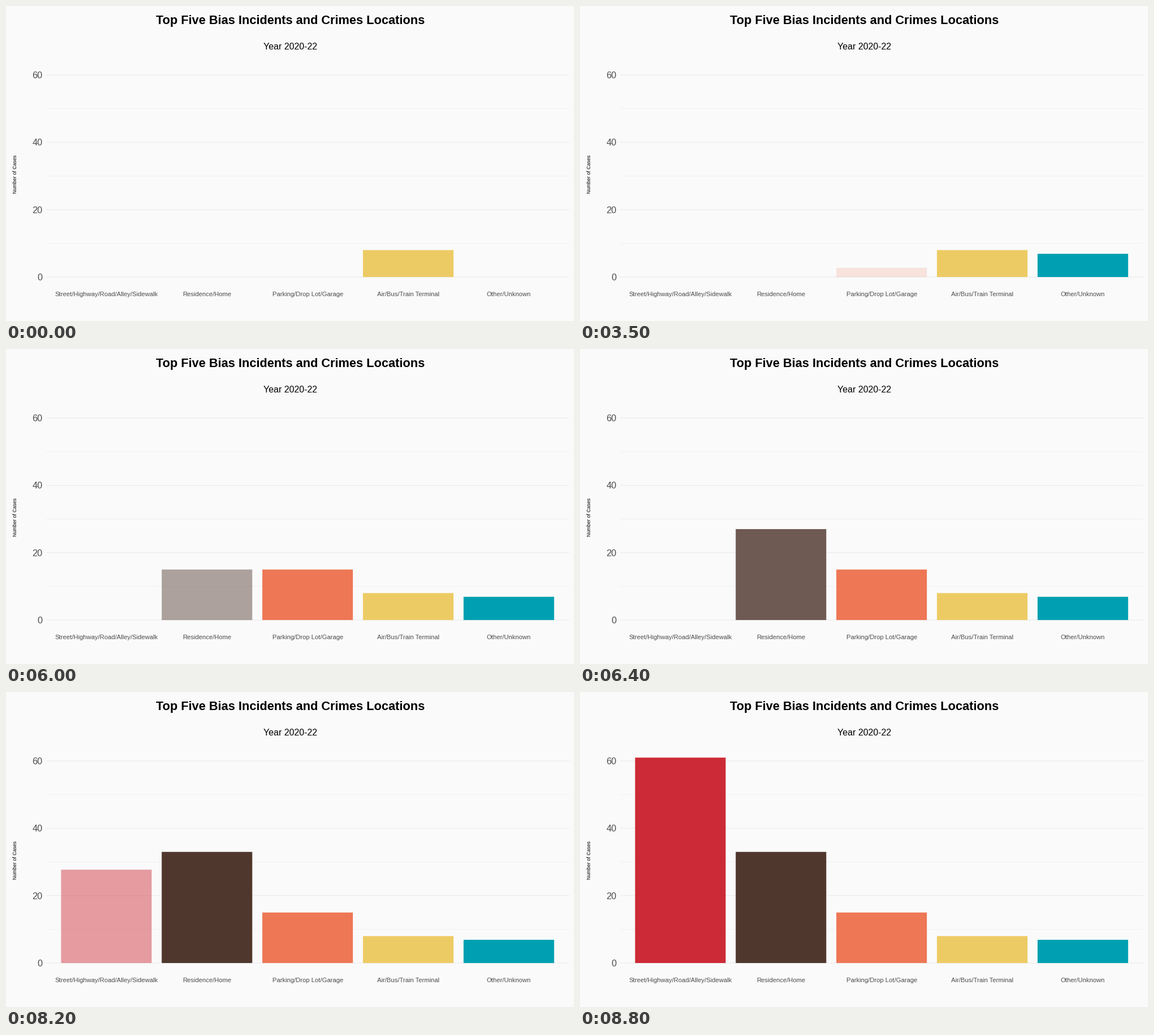
A matplotlib script for the animation above (10 s loop, 1004x558 px).

```python
import matplotlib.pyplot as plt
from matplotlib.animation import FuncAnimation
from matplotlib.patches import Rectangle

W, H, DPI = 1004, 558, 64
FRAMES, INTERVAL = 100, 100
GROW = 11                       # frames a bar needs to grow and fade in

BASE, UNIT = 480.1, 5.965       # y of zero, pixels per case
PANEL_L, PANEL_R = 70.7, 995.6
BAR_L, BAR_W, PITCH = 97.4, 160.05, 177.85
GREY = "#4D4D4D"

# label, cases, colour, frame the growth starts from, first visible frame
BARS = [
    ("Street/Highway/Road/Alley/Sidewalk", 61, "#CC2A36", 77, 78),
    ("Residence/Home", 33, "#4F372D", 55, 56),
    ("Parking/Drop Lot/Garage", 15, "#EE7755", 33, 35),
    ("Air/Bus/Train Terminal", 8, "#EDCB64", -GROW, 0),
    ("Other/Unknown", 6.9, "#00A0B2", 11, 12),
]

plt.rcParams["font.family"] = "Liberation Sans"


def pt(px):
    return px * 72 / DPI


fig = plt.figure(figsize=(W / DPI, H / DPI), dpi=DPI, facecolor="#FAFAFA")
ax = fig.add_axes([0, 0, 1, 1])
ax.set_xlim(0, W)
ax.set_ylim(H, 0)
ax.axis("off")


def label(x, y, text, size, color="black", ha="center", **kw):
    ax.text(x, y, text, fontsize=pt(size), color=color, ha=ha,
            va="baseline", **kw)


label(502.3, 32, "Top Five Bias Incidents and Crimes Locations", 21.75,
      weight="bold")
label(502.5, 77, "Year 2020-22", 16)
label(19, 298.3, "Number of Cases", 8.7, rotation=90, rotation_mode="anchor")

for cases in range(0, 61, 10):
    y = BASE - cases * UNIT
    major = cases % 20 == 0
    ax.plot([PANEL_L, PANEL_R], [y, y], color="#EBEBEB", zorder=1,
            lw=pt(1.15 if major else 0.58), solid_capstyle="butt", snap=False)
    if major:
        label(64.3, y + 5.9, str(cases), 16.3, GREY, ha="right")

rects = []
for i, (name, cases, color, start, first) in enumerate(BARS):
    x = BAR_L + i * PITCH
    label(x + BAR_W / 2 + 0.3, 514, name, 11.3, GREY)
    rect = Rectangle((x, BASE), BAR_W, 0, facecolor=color, lw=0,
                     snap=False, zorder=2)
    rects.append(ax.add_patch(rect))


def update(frame):
    for rect, (_, cases, _, start, first) in zip(rects, BARS):
        p = min(max((frame - start) / GROW, 0), 1)
        rect.set_height(-cases * UNIT * p)
        rect.set_alpha(p)
        rect.set_visible(frame >= first)
    return rects


anim = FuncAnimation(fig, update, frames=FRAMES, interval=INTERVAL,
                     repeat=True, repeat_delay=0, blit=False)
plt.show()
```
